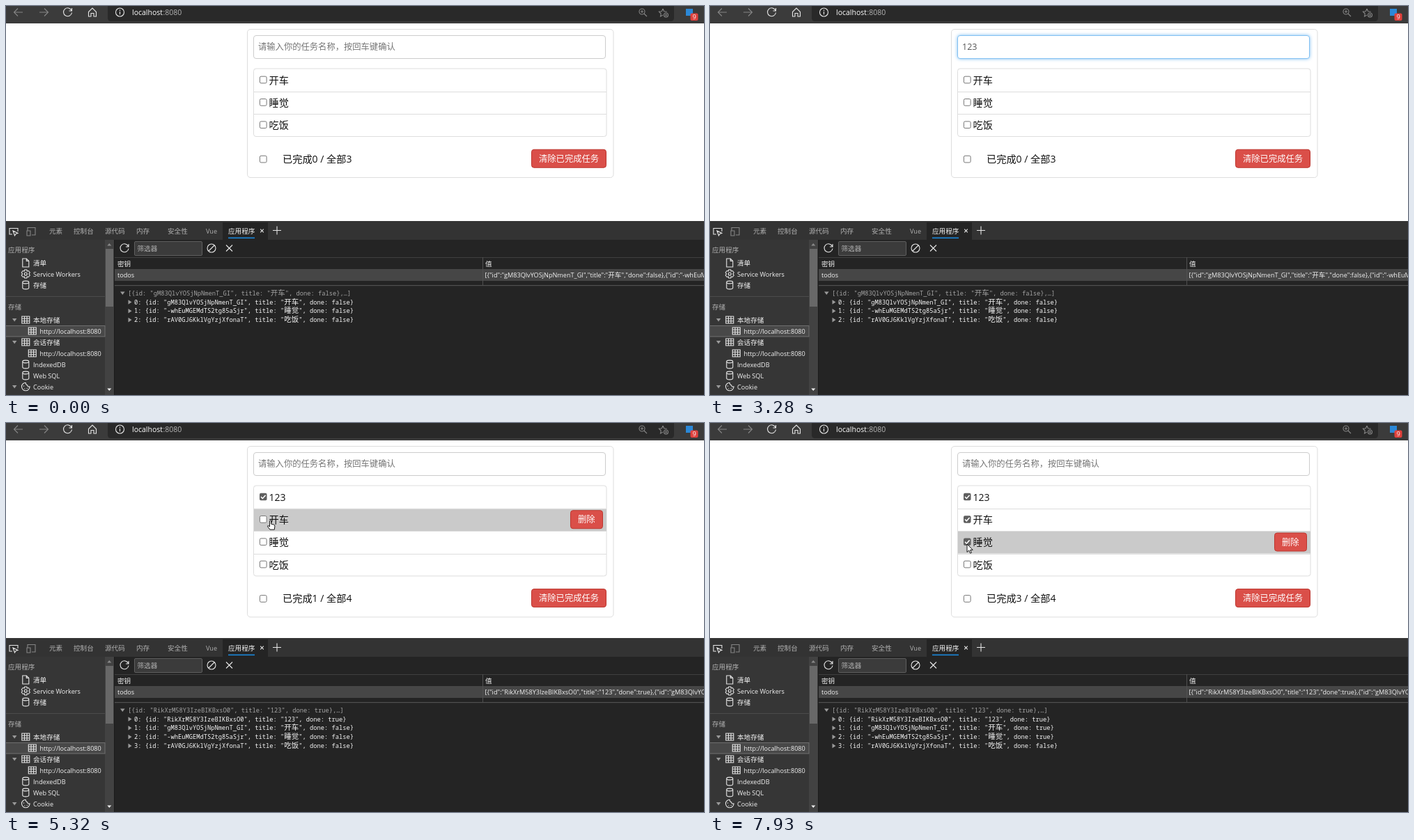
These frames come from a looping animation (1002 by 559 pixels, 8000 ms). An HTML page:

```html
<!DOCTYPE html>
<html lang="zh-CN">
<head>
<meta charset="utf-8">
<title>Todo list with storage inspector</title>
<style>
  html, body { margin: 0; width: 100%; height: 100%; overflow: hidden; background: #fff; }
  svg { display: block; width: 100%; height: 100%; }
  text { font-family: "Open Sans", "Noto Sans CJK SC", "Noto Sans CJK", sans-serif; white-space: pre; }
  tspan { font-family: "Noto Sans CJK SC", "Noto Sans CJK", sans-serif; }
  .url { font-size: 10.5px; fill: #fff; }
  .page { font-size: 14px; fill: #111; }
  .page tspan { font-size: 14.2px; }
  .form { font-size: 12.5px; fill: #757575; }
  .form tspan { font-size: 12.3px; }
  .light { fill: #fff; }
  .typed { fill: #555; }
  .dev { font-size: 9.15px; fill: #f2f2f2; }
  .dev tspan { font-size: 9.6px; }
  .dim { fill: #b0b0b0; }
  .mono { font: 500 8.75px "Noto Sans Mono", "DejaVu Sans Mono", monospace; fill: #f4f4f4; }
  .mono tspan { font-size: 10.5px; }
  .mono.dim { fill: #a3a3a3; }
  .icon { fill: none; stroke: #e6e6e6; stroke-width: 1.1; }
  .faded { stroke: #858585; }
  .button { fill: #da4f49; stroke: #bd362f; }
  .box { fill: #fff; stroke: #767676; }
  .field { fill: #fff; stroke: #ccc; }
  .focus { stroke: #82c0f2; filter: drop-shadow(0 0 2.8px rgba(82, 168, 236, .75)); }
  .pointer { fill: #fff; stroke: #000; stroke-width: .9; stroke-linejoin: round; }
</style>
</head>
<body>
<svg viewBox="0 0 1002 559" preserveAspectRatio="none">
  <clipPath id="cell"><rect x="685" y="378" width="317" height="17"/></clipPath>
  <g id="chrome"></g>
  <g id="app"></g>
  <g id="overlay">
    <circle id="flash" r="9.5" fill="#ffec00" opacity=".68"/>
    <path id="arrow" class="pointer" d="M0 0V11.5L2.7 9 4.6 13.2 6.4 12.4 4.6 8.4H8.2Z"/>
    <path id="hand" class="pointer" d="M-1.2 .8C-1.2-.4 1-.4 1 .8V5L4.5 5.8Q6.3 6.2 6.2 8L5.6 13H-.8L-4 8.8Q-4.6 7.3-3 7.4L-1.2 8.8Z"/>
    <path id="beam" d="M-2.5-6H2.5M0-6V6M-2.5 6H2.5" fill="none" stroke="#222"/>
  </g>
</svg>
<script>
const LOOP = 8000;
const ROW_TOP = 90.5, ROW_H = 32.35;
const $ = id => document.getElementById(id);

const escape = s => s.replace(/&/g, '&amp;').replace(/</g, '&lt;');
const text = (x, y, cls, s) =>
  `<text x="${x}" y="${y}" class="${cls}">${escape(s).replace(/[\u3000-\u9fff\uff00-\uffef]+/g, '<tspan>$&</tspan>')}</text>`;
const rect = (x, y, w, h, fill, more = '') =>
  `<rect x="${x}" y="${y}" width="${w}" height="${h}" ${fill ? `fill="${fill}"` : ''} ${more}/>`;
const shape = (d, fill) => `<path d="${d}" fill="${fill}"/>`;
const icon = (x, y, d, cls = '') => `<path class="icon ${cls}" transform="translate(${x} ${y})" d="${d}"/>`;

const ICON = {
  back: 'M6 0H-6M-1-5.5L-6.5 0L-1 5.5',
  forward: 'M-6 0H6M1-5.5L6.5 0L1 5.5',
  reload: 'M5.6-2.5A6 6 0 1 0 6 .5M6-6V-2H2',
  stop: 'M-5-5L5 5M5-5L-5 5',
  home: 'M-5.5-.5L0-6L5.5-.5V6H2V1.5H-2V6H-5.5Z',
  info: 'M-6 0A6 6 0 1 0 6 0A6 6 0 1 0-6 0M0-1V3.2M0-3.4V-2.1',
  zoom: 'M-5-1A4 4 0 1 0 3-1A4 4 0 1 0-5-1M2 2L6 6M-3-1H1M-1-3V1',
  star: 'M-1-6L.7-2.3 4.6-1.8M-1-6L-2.7-2.3-6.6-1.8-3.8 1-4.5 5-1 3M6.5 3A3 3 0 1 1 .5 3A3 3 0 1 1 6.5 3M3.5 1.5V4.5M2 3H5',
  inspect: 'M-2 4H-6V-4.5H6V0M-1-1L6 2.5 3 3.5 1.5 6Z',
  device: 'M-5-1V-5.5H6V5H1M-6-1H-1V6H-6Z',
  block: 'M-6 0A6 6 0 1 0 6 0A6 6 0 1 0-6 0M4-4L-4 4',
  cross: 'M-4.5-4.5L4.5 4.5M4.5-4.5L-4.5 4.5',
  smallCross: 'M-2.3-2.3L2.3 2.3M2.3-2.3L-2.3 2.3',
  plus: 'M-6 0H6M0-6V6',
  page: 'M-4.5-6H1L4.5-2.5V6H-4.5ZM1-6V-2.5H4.5',
  gear: 'M-2 0A2 2 0 1 0 2 0A2 2 0 1 0-2 0M-1.5-6H1.5L2-4 4-4.5 6-2 4.7 0 6 2 4 4.5 2 4 1.5 6H-1.5L-2 4-4 4.5-6 2-4.7 0-6-2-4-4.5-2-4Z',
  store: 'M-4.5-4C-4.5-6.5 4.5-6.5 4.5-4V4C4.5 6.5-4.5 6.5-4.5 4ZM-4.5-4C-4.5-1.5 4.5-1.5 4.5-4',
  grid: 'M-5.5-5H5.5V5H-5.5ZM-5.5-1.7H5.5M-5.5 1.7H5.5M-1.8-5V5M1.8-5V5',
  cookie: 'M0-5.8A5.8 5.8 0 1 0 5.8 0C3 .6 2.4-1 2.4-2.2C.7-2 0-4 0-5.8M-2.8-1.5V-.3M-1.5 2.4V3.5M2 2V3'
};

function drawChrome() {
  const tabs = [['元素', 62], ['控制台', 97], ['源代码', 142], ['内存', 187], ['安全性', 232], ['Vue', 287]];
  const tree = [
    ['清单', 39, 369, 'page'], ['Service Workers', 39, 385, 'gear'], ['存储', 39, 401, 'store'],
    ['本地存储', 39, 451, 'grid'], ['http://localhost:8080', 48.5, 467, 'grid'],
    ['会话存储', 39, 483, 'grid'], ['http://localhost:8080', 48.5, 499, 'grid'],
    ['IndexedDB', 39, 515, 'store'], ['Web SQL', 39, 531, 'store'], ['Cookie', 39, 547, 'cookie']
  ];
  $('chrome').innerHTML = [
    rect(0, 0, 1002, 25, '#3b3b3b'),
    shape('M146 0H959V17Q959 22 954 22H151Q146 22 146 17Z', '#292929'),
    icon(18, 9, ICON.back, 'faded'), icon(54, 9, ICON.forward, 'faded'),
    icon(124, 9, ICON.home), icon(163.5, 9, ICON.info),
    text(181, 13, 'url', 'localhost') + '<text x="225.5" y="13" class="url dim" style="fill:#b5b5b5">:8080</text>',
    icon(914, 9, ICON.zoom, 'faded'), icon(944, 10, ICON.star, 'faded'),
    rect(976, 4, 10, 10, '#2b88d8'),
    rect(982.5, 10.5, 11, 10.5, '#e0413d', 'rx="2"'), text(985.6, 18.8, 'dev light', '9'),

    rect(0, 309, 1002, 250, '#242424'),
    rect(0, 309, 1002, 27, '#333'),
    rect(311, 311, 65, 25, '#242424'),
    icon(11, 324, ICON.inspect), icon(36, 324, ICON.device, 'faded'),
    ...tabs.map(([s, x]) => text(x, 326.6, 'dev dim', s)),
    text(319, 326.6, 'dev light', '应用程序'), rect(319, 332.5, 38, 1.6, '#1a86d9'),
    icon(367.5, 323, ICON.smallCross), icon(389, 322.5, ICON.plus),

    rect(0, 336, 142, 223, '#363636'),
    rect(142, 336, 13, 223, '#424242'), rect(143, 349, 11, 83, '#686868'),
    rect(155, 336, 1, 223, '#1c1c1c'),
    shape('M145.3 344.5H151.3L148.3 341Z', '#8a8a8a'), shape('M145.3 549.5H151.3L148.3 553Z', '#eee'),
    rect(0, 417, 142, 1, '#4c4c4c'),
    rect(-1, 459.5, 143, 15.5, '#484848', 'stroke="#707070"'),
    text(3, 353.6, 'dev dim', '应用程序'), text(3, 435.6, 'dev dim', '存储'),
    ...tree.map(([s, x, y, name]) => icon(x - 10.7, y, ICON[name]) + text(x, y + 3.6, 'dev', s)),
    ...[451, 483, 547].map(y => shape(`M9 ${y - 2}H15.5L12.2 ${y + 2.5}Z`, '#9a9a9a')),

    icon(170, 348, ICON.reload),
    rect(184.5, 338.5, 97, 20, '#3b3b3b', 'stroke="#5e5e5e" rx="1.5"'),
    text(188.5, 352, 'dev dim', '筛选器'),
    icon(295, 348, ICON.block), icon(320.5, 348, ICON.cross),

    rect(156, 361, 846, 1, '#404040'),
    rect(156, 378, 846, 17, '#464646'),
    rect(156, 401, 846, 1.2, '#505050'),
    rect(684, 361, 1, 40, '#505050'),
    text(160, 373.6, 'dev', '密钥'), text(688, 373.6, 'dev', '值'), text(160, 390.3, 'dev', 'todos')
  ].join('');
}

const TODOS = [
  { id: 'RikXrM58Y3IzeBIKBxsO0', title: '123', added: 3630, doneAt: 5180 },
  { id: 'gM83QlvYOSjNpNmenT_GI', title: '开车', added: -1, doneAt: 7200 },
  { id: '-whEuMGEMdTS2tg85aSjr', title: '睡觉', added: -1, doneAt: 7840 },
  { id: 'rAV0GJ6KklVgYzjXfonaT', title: '吃饭', added: -1, doneAt: Infinity }
];

// Pointer path: time, x, y
const PATH = [
  [60, 821, 462], [300, 560, 300], [520, 300, 160], [700, 130, 40], [790, 88, 10], [940, 88, 10],
  [1290, 398, 89], [1430, 398, 89], [1790, 431, 64], [4290, 431, 66], [4360, 418, 160], [4440, 397.5, 148],
  [4870, 368, 117], [5020, 369, 107], [5250, 369, 107], [5930, 473, 429], [5990, 473, 430], [6140, 471, 428],
  [6300, 472, 428], [6520, 473, 437], [6600, 473, 437], [6970, 388.5, 152.5], [7150, 369, 140], [7260, 369, 140],
  [7410, 369, 167], [7840, 369, 169], [7920, 369, 174]
];
const CLICKS = [880, 2120, 5180, 7200, 7840];
const between = (t, a, b) => t >= a && t < b;

function pointerAt(t) {
  if (t < PATH[0][0] || between(t, 2480, 4290)) return null;
  const next = PATH.findIndex(p => p[0] > t);
  if (next < 0) return PATH.at(-1).slice(1);
  const [t0, x0, y0] = PATH[next - 1], [t1, x1, y1] = PATH[next];
  const k = (t - t0) / (t1 - t0);
  return [x0 + (x1 - x0) * k, y0 + (y1 - y0) * k];
}

function stateAt(t) {
  const todos = TODOS.filter(d => t >= d.added).map(d => ({ ...d, done: t >= d.doneAt }));
  const pos = pointerAt(t);
  let hover = -1, cursor = 'arrow';
  if (pos) {
    const [x, y] = pos;
    const row = Math.floor((y - ROW_TOP) / ROW_H);
    if (between(x, 356, 862) && row >= 0 && row < todos.length) {
      hover = row;
      const fromCentre = Math.abs(y - ROW_TOP - (row + .5) * ROW_H);
      const onBox = between(x, 363, 375) && fromCentre < 6;
      if (between(x, 363, 407) && !onBox) cursor = 'hand';
    }
    if (between(x, 356, 861) && between(y, 42, 76)) cursor = 'beam';
  }
  const focused = between(t, 2120, 5180);
  return {
    pos, cursor,
    view: {
      todos, hover, focused,
      typed: t >= 3630 ? '' : '123'.slice(0, [2480, 2660, 2820].filter(k => t >= k).length),
      caret: focused && (t < 3280 || between(t, 3840, 4340) || t >= 4840),
      loading: between(t, 940, 1430),
      overReload: !!pos && between(pos[0], 73, 104) && pos[1] < 25
    }
  };
}

const checkbox = (cy, on) => on
  ? rect(364, cy - 5.3, 10.5, 10.5, '#5f5f5f', 'rx="2"') +
    `<path d="M366 ${cy}l2.3 2.4 4.3-4.8" fill="none" stroke="#fff" stroke-width="1.5"/>`
  : rect(364.4, cy - 4.9, 9.7, 9.7, '', 'class="box" rx="1.8"');
const button = (x, cy, w, label) =>
  rect(x + .5, cy - 13, w - 1, 26, '', 'class="button" rx="3.5"') + text(x + 11, cy + 4.5, 'form light', label);

function todoRow({ title, done }, i, hover) {
  const top = ROW_TOP + i * ROW_H, cy = top + ROW_H / 2;
  return (hover === i ? rect(356, top, 506, ROW_H, '#cacaca') : '') +
    (i ? rect(356, Math.round(top), 506, 1, '#ddd') : '') +
    checkbox(cy - .6, done) + text(377.5, cy + 5, 'page', title) +
    (hover === i ? button(810, cy - .3, 47, '删除') : '');
}

function drawApp({ todos, hover, focused, typed, caret, loading, overReload }) {
  const end = ROW_TOP + todos.length * ROW_H, foot = end + 32.3;
  const doneCount = todos.filter(d => d.done).length;
  const json = JSON.stringify(todos.map(({ id, title, done }) => ({ id, title, done })));
  const preview = d => `{id: "${d.id}", title: "${d.title}", done: ${d.done}}`;
  $('app').innerHTML = [
    overReload ? rect(73, -6, 31, 30, '#505050', 'rx="4"') : '',
    icon(88.5, 9, loading ? ICON.stop : ICON.reload),
    rect(346.5, 33.5, 525.5, end - 33.5 + 59, '#fff', 'stroke="#ddd" rx="4.5"'),
    rect(355.5, 42.5, 505, 33, '', `class="field ${focused ? 'focus' : ''}" rx="3.5"`),
    typed ? text(362, 62.8, 'form typed', typed) : text(362, 62.8, 'form', '请输入你的任务名称，按回车键确认'),
    caret ? rect(362 + typed.length * 7.15, 52, 1, 13.5, '#222') : '',
    rect(355.5, 90, 506.5, end - 90, '#fff', 'stroke="#ddd" rx="3.5"'),
    ...todos.map((d, i) => todoRow(d, i, hover)),
    checkbox(foot + .3, false),
    text(397, foot + 5, 'page', `已完成${doneCount} / 全部${todos.length}`),
    button(754, foot - .6, 108, '清除已完成任务'),
    `<g clip-path="url(#cell)">${text(687.5, 390.3, 'dev', json)}</g>`,
    shape('M164 410.5H170.6L167.3 415Z', '#9a9a9a'),
    text(175, 415.6, 'mono dim', `[${preview(todos[0])},…]`),
    ...todos.map((d, i) => {
      const y = 425.5 + i * 12.8;
      return shape(`M175.5 ${y - 3.3}V${y + 3.3}L180.5 ${y}Z`, '#9a9a9a') +
        text(184, y + 3.1, 'mono', `${i}: ${preview(d)}`);
    })
  ].join('');
}

let start, lastView;
function tick(now) {
  start ??= now;
  const t = (now - start) % LOOP;
  const { pos, cursor, view } = stateAt(t);
  const key = JSON.stringify(view);
  if (key !== lastView) {
    drawApp(view);
    lastView = key;
  }
  $('overlay').style.display = pos ? '' : 'none';
  if (pos) $('overlay').setAttribute('transform', `translate(${pos})`);
  for (const name of ['arrow', 'hand', 'beam']) $(name).style.display = name === cursor ? '' : 'none';
  $('flash').style.display = CLICKS.some(c => between(t, c, c + 70)) ? '' : 'none';
  requestAnimationFrame(tick);
}

drawChrome();
requestAnimationFrame(tick);
</script>
</body>
</html>
```
